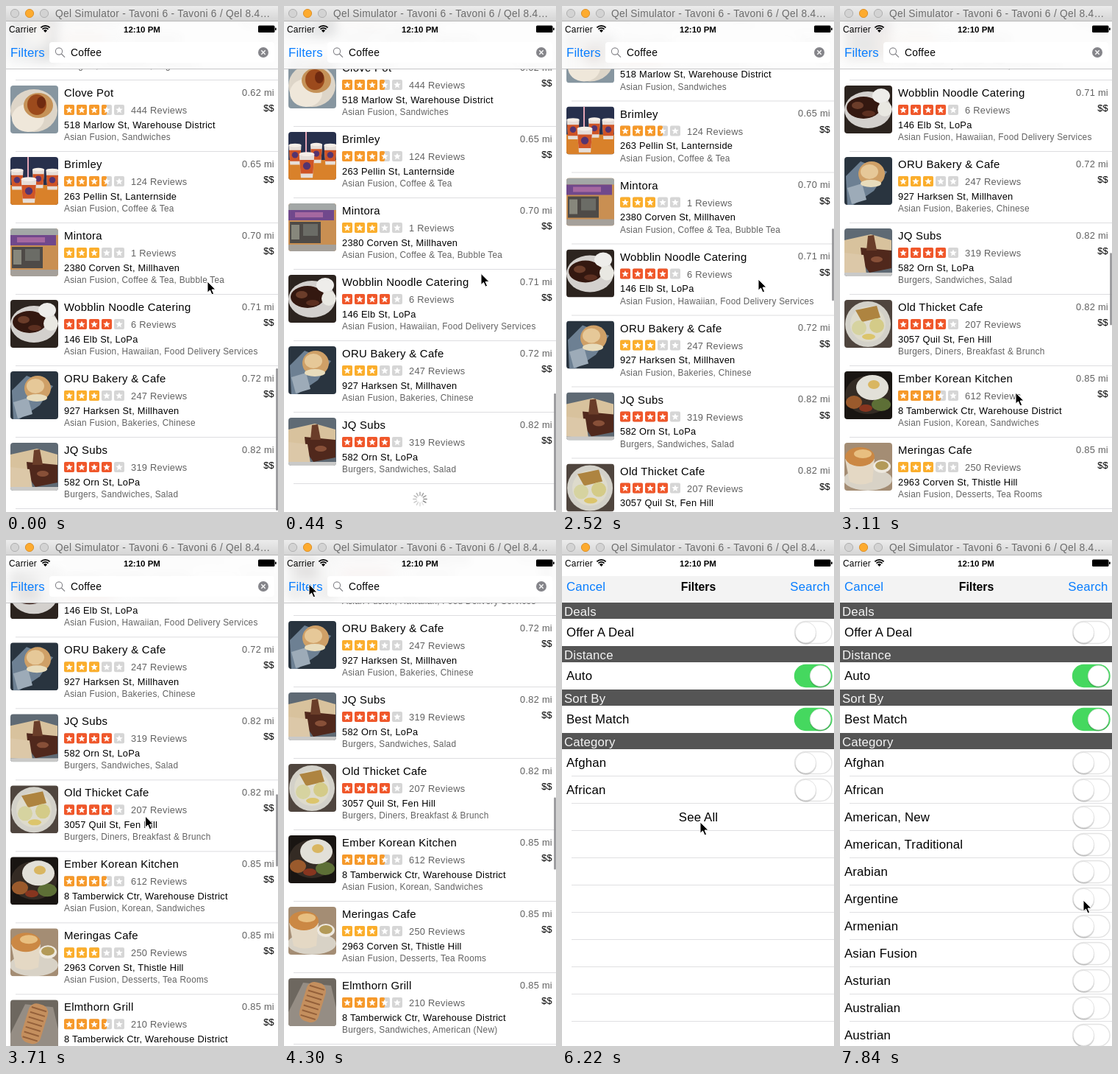
An HTML page for the animation above (7990 ms loop, 370 by 687 pixels).

```html
<!DOCTYPE html>
<html lang="en">
<head>
<meta charset="utf-8">
<title>Places and filters</title>
<style>
html, body { margin: 0; height: 100%; overflow: hidden; background: #fff; }
svg { display: block; width: 100vw; height: 100vh; }
text { font: 12.83px "Liberation Sans", Arial, sans-serif; letter-spacing: .021em; white-space: pre; }
.name { font-size: 14.9px; }
.kind { font-size: 11.85px; }
.big { font-size: 16.8px; letter-spacing: .01em; }
.bold { font-weight: bold; letter-spacing: 0; }
.soft { fill: #626262; }
.blue { fill: #087dff; }
.end { text-anchor: end; }
.mid { text-anchor: middle; }
</style>
</head>
<body>
<svg id="stage" viewBox="0 0 370 687"></svg>
<script>
const LOOP = 7990, STEP = 147.96, ROW = 97;

const rect = (x, y, w, h, fill, more = '') =>
  `<rect x="${x}" y="${y}" width="${w}" height="${h}" fill="${fill}" ${more}/>`;
const oval = (x, y, rx, ry, fill, more = '') =>
  `<ellipse cx="${x}" cy="${y}" rx="${rx}" ry="${ry}" fill="${fill}" ${more}/>`;
const path = (d, more) => `<path d="${d}" ${more}/>`;
const shape = (d, fill) => path(d, `fill="${fill}"`);
const text = (x, y, s, cls = '', more = '') =>
  `<text x="${x}" y="${y}" class="${cls}" ${more}>${s.replace(/&/g, '&amp;')}</text>`;
const range = (n, f) => Array.from({ length: n }, (_, i) => f(i)).join('');
const clamp = v => Math.max(0, Math.min(1, v));

// Food pictures, each 65 x 65
const cup = (x, y, s) => `<g transform="translate(${x} ${y}) scale(${s})">` +
  shape('M-9 0H9L7 28H-7Z', '#e6ded8') + shape('M-8.5 7H8.5L7.3 23H-7.3Z', '#cf5426') +
  oval(0, 14, 4.5, 4.5, '#54346f') + oval(0, 0, 9, 2.5, '#f6efe8') + '</g>';

const pics = {
  bowl: () => rect(0, 0, 65, 65, '#8796a0') + oval(32, 34, 32, 29, '#ddd5c8') + oval(24, 44, 22, 19, '#efe7da') +
    oval(38, 27, 20, 17, '#c59258') + oval(36, 26, 13, 14, '#9c4a1c') + oval(42, 23, 6, 8, '#6f2a10'),
  cups: () => rect(0, 0, 65, 65, '#27304c') + rect(0, 38, 65, 27, '#d9812a') + cup(9, 18, .95) + cup(38, 17, .9) +
    cup(57, 18, .95) + rect(23, 0, 2, 32, '#e3a3b4') + cup(25, 30, 1.15),
  shop: () => rect(0, 0, 65, 65, '#c98f52') + rect(0, 0, 65, 9, '#a3a7a6') + rect(0, 9, 62, 14, '#70488c') +
    rect(9, 12, 38, 7, '#a568a0') + rect(2, 25, 42, 29, '#4e4a47') + rect(4, 29, 11, 20, '#87877c') +
    rect(20, 28, 20, 16, '#6b6c66') + rect(0, 56, 65, 9, '#a5a09a'),
  plate: () => rect(0, 0, 65, 65, '#2c241f') + oval(32, 33, 32, 25, '#d3d0cd') + oval(26, 30, 23, 15, '#341810') +
    oval(18, 27, 8, 5, '#6b3d2a') + oval(33, 38, 9, 4, '#5c2f20') + oval(50, 14, 12, 10, '#eeedea') + oval(55, 32, 10, 10, '#e9e8e2'),
  bun: () => rect(0, 0, 65, 65, '#29343f') + shape('M2 26L22 6L58 20L40 46L12 65H4Z', '#6d8093') +
    shape('M4 42L24 36L30 58L10 64Z', '#9dabb8') + oval(37, 23, 18, 17, '#cfa067') +
    oval(34, 20, 12, 10, '#e6c898') + oval(36, 36, 14, 5, '#e8dcbc'),
  sub: () => rect(0, 0, 65, 65, '#5f6a74') + shape('M0 16L36 8L64 16V40L0 36Z', '#d8c29d') +
    shape('M22 26L64 30V54L34 60L24 46Z', '#50281c') + shape('M0 33L26 36L30 62L0 60Z', '#dcc8a8') +
    shape('M32 10L40 9L44 30L30 30Z', '#6a3d29') + oval(44, 42, 8, 4, '#885038') + rect(0, 60, 65, 5, '#c9c9c8'),
  eggs: () => rect(0, 0, 65, 65, '#4f453e') + oval(32, 33, 31, 31, '#d3d1c9') + oval(32, 33, 24, 24, '#dedbcc') +
    shape('M15 14L44 8L49 24L24 30Z', '#ae8440') + oval(20, 38, 10, 10, '#d6d3a0') + oval(44, 35, 10, 10, '#d4cb88') + oval(33, 50, 9, 4, '#dcc56c'),
  stone: () => rect(0, 0, 65, 65, '#191512') + oval(32, 32, 31, 26, '#342b24') + oval(13, 42, 11, 9, '#9a5a2c') +
    oval(50, 45, 13, 9, '#5d6f36') + oval(38, 22, 22, 17, '#e2e0d8') + oval(40, 18, 8, 6, '#d9b661') + oval(29, 50, 9, 5, '#87351f'),
  souffle: () => rect(0, 0, 65, 65, '#a48d74') + oval(32, 50, 33, 15, '#d8d2c6') + shape('M1 22H41L38 53Q22 60 7 53Z', '#e4d8c4') +
    oval(21, 19, 20, 13, '#cb8844') + oval(25, 15, 12, 6, '#e8bf80') + oval(51, 32, 12, 9, '#eee9df') + oval(51, 31, 9, 6, '#b39a58'),
  wrap: () => rect(0, 0, 65, 65, '#6d675f') + shape('M0 46L20 6L58 10L65 40V65H0Z', '#958d84') +
    `<g transform="rotate(17 33 34)">` + rect(19, 5, 27, 55, '#c48f5e', 'rx="11"') +
    range(7, i => rect(22, 11 + i * 7, 21, 2, '#94603a')) + '</g>'
};

// name, stars, reviews, miles, address, kinds, picture
const places = [
  ['Corner Pot', 3.5, '98', '0.60', '21 Ardel St, Millhaven', 'Burgers, Sandwiches, Vegetarian', 'bun'],
  ['Clove Pot', 3.5, '444', '0.62', '518 Marlow St, Warehouse District', 'Asian Fusion, Sandwiches', 'bowl'],
  ['Brimley', 3.5, '124', '0.65', '263 Pellin St, Lanternside', 'Asian Fusion, Coffee & Tea', 'cups'],
  ['Mintora', 3, '1', '0.70', '2380 Corven St, Millhaven', 'Asian Fusion, Coffee & Tea, Bubble Tea', 'shop'],
  ['Wobblin Noodle Catering', 4, '6', '0.71', '146 Elb St, LoPa', 'Asian Fusion, Hawaiian, Food Delivery Services', 'plate'],
  ['ORU Bakery & Cafe', 3, '247', '0.72', '927 Harksen St, Millhaven', 'Asian Fusion, Bakeries, Chinese', 'bun'],
  ['JQ Subs', 4, '319', '0.82', '582 Orn St, LoPa', 'Burgers, Sandwiches, Salad', 'sub'],
  ['Old Thicket Cafe', 4, '207', '0.82', '3057 Quil St, Fen Hill', 'Burgers, Diners, Breakfast & Brunch', 'eggs'],
  ['Ember Korean Kitchen', 3.5, '612', '0.85', '8 Tamberwick Ctr, Warehouse District', 'Asian Fusion, Korean, Sandwiches', 'stone'],
  ['Meringas Cafe', 3, '250', '0.85', '2963 Corven St, Thistle Hill', 'Asian Fusion, Desserts, Tea Rooms', 'souffle'],
  ['Elmthorn Grill', 3.5, '210', '0.85', '8 Tamberwick Ctr, Warehouse District', 'Burgers, Sandwiches, American (New)', 'wrap']
];
const starTint = { 3: '#fbae2c', 3.5: '#f6992a', 4: '#f0572a' };
const starPath = 'M' + Array.from({ length: 10 }, (_, i) => {
  const a = i * Math.PI / 5, r = i % 2 ? 2.2 : 5;
  return (7 + r * Math.sin(a)).toFixed(2) + ' ' + (7.4 - r * Math.cos(a)).toFixed(2);
}).join('L') + 'Z';

const stars = n => range(5, i => `<g transform="translate(${79 + 17 * i} 26)">` +
  rect(0, 0, 14, 14, '#d6d6d6', 'rx="2"') +
  (n > i ? rect(0, 0, 14 * Math.min(1, n - i), 14, starTint[n], 'rx="2"') : '') +
  shape(starPath, '#fff') + '</g>');

const place = ([name, rating, reviews, miles, address, kinds, pic], i) =>
  `<g transform="translate(0 ${108 + ROW * (i - 1)})">` +
  `<g transform="translate(6 0)" clip-path="url(#photo)">${pics[pic]()}</g>` +
  text(79, 15, name, 'name') + stars(rating) +
  text(170, 38, reviews + ' Reviews', 'soft') + text(79, 57.6, address) + text(79, 74, kinds, 'kind soft') +
  text(365, 13.5, miles + ' mi', 'soft end') + text(365, 35, '$$', 'end') +
  rect(13, 89, 357, 1, '#dddde0') + '</g>';

const spinner = '<g id="spin" transform="translate(185 703.5)">' +
  range(12, i => path('M0 -5V-9.2', `stroke="#777" stroke-width="1.5" stroke-linecap="round"
    opacity="${.2 + i * .06}" transform="rotate(${i * 30})"`)) + '</g>';

const toggle = (y, on) => `<g transform="translate(316 ${y})">` +
  rect(.5, -15, 50.5, 30, on ? '#45d85f' : '#fff', `rx="15" stroke="${on ? '#45d85f' : '#e3e3e3'}" stroke-width="1.4"`) +
  oval(on ? 35.5 : 15.5, 2, 14.5, 14.2, '#000', 'opacity=".16"') +
  oval(on ? 35.5 : 15.5, 0, 14.2, 14.2, '#fff', 'stroke="#d0d0d0" stroke-width=".6"') + '</g>';
const option = (y, label, on) => text(6, y + 5.7, label, 'big') + toggle(y, on);
const header = (y, label) => rect(0, y, 370, 22, '#555') + text(3, y + 18, label, 'big', 'fill="#f4f4f4"');

const kinds = ['American, New', 'American, Traditional', 'Arabian', 'Argentine', 'Armenian',
  'Asian Fusion', 'Asturian', 'Australian', 'Austrian'];

const filters = '<g id="modal">' + rect(0, 21, 370, 687, '#fff') + rect(0, 49, 370, 36, '#f3f3f3') +
  text(6, 69, 'Cancel', 'big blue') + text(364.5, 69, 'Search', 'big blue end') +
  text(185.5, 69, 'Filters', 'bold mid', 'style="font-size:15.8px"') +
  header(85, 'Deals') + option(125.5, 'Offer A Deal') +
  header(144, 'Distance') + option(184.5, 'Auto', true) +
  header(203, 'Sort By') + option(243.5, 'Best Match', true) +
  header(262, 'Category') + option(302.5, 'Afghan') + option(339.5, 'African') +
  range(10, i => rect(13, 320 + 37 * i, 357, 1, '#e0e0e2')) +
  text(185.5, 382, 'See All', 'big mid', 'id="seeAll"') +
  `<g id="more">${range(kinds.length, i => option(376.5 + 37 * i, kinds[i]))}</g></g>`;

const navBar = rect(0, 21, 370, 64, '#fdfdfd') +
  '<g clip-path="url(#bar)"><g opacity=".14" filter="url(#blur)"><use href="#list"/></g></g>' +
  rect(59, 49, 306, 28, '#fff', 'rx="4"') + rect(0, 85, 370, .8, '#b8b8bb') +
  text(6, 69, 'Filters', 'big blue') + text(88, 67.5, 'Coffee', '', 'style="font-size:13.8px"') +
  oval(72, 61.5, 4.6, 4.6, 'none', 'stroke="#85858a" stroke-width="1.1"') +
  path('M75.4 65L80 69.6', 'stroke="#85858a" stroke-width="1.3"') +
  oval(350, 63, 7, 7, '#85858a') + path('M347.3 60.3l5.4 5.4m0 -5.4l-5.4 5.4', 'stroke="#fff" stroke-width="1.3"');

const arc = (r, w) => path(`M${53.5 - r * .72} ${35.5 - r * .72}A${r} ${r} 0 0 1 ${53.5 + r * .72} ${35.5 - r * .72}`,
  `fill="none" stroke="#000" stroke-width="${w}"`);
const status = text(4, 35.5, 'Carrier', 'kind') + arc(8.5, 1.8) + arc(5.5, 1.8) + shape('M53.5 36L51 33.2Q53.5 31 56 33.2Z', '#000') +
  text(185, 35.5, '12:10 PM', 'bold mid', 'style="font-size:11.5px"') +
  rect(343, 26.5, 22.5, 9.5, '#000', 'rx="1.5"') + rect(366, 29.5, 1.7, 3.6, '#000', 'rx=".8"');

const light = (x, fill, edge) => oval(x, 10, 5.6, 5.6, fill, `stroke="${edge}"`);
const titleBar = rect(0, 0, 370, 21, 'url(#chrome)') + rect(0, 20, 370, 1, '#b9b9b9') +
  light(12, '#d3d3d3', '#b0b0b0') + light(32, '#fdab2f', '#dd912a') + light(52, '#d3d3d3', '#b0b0b0') +
  text(67, 15, 'Qel Simulator - Tavoni 6 - Tavoni 6 / Qel 8.4…', '', 'fill="#6c6c6c" style="font-size:13.75px"');

stage.innerHTML = `<defs>
  <clipPath id="photo"><rect width="65" height="65" rx="4"/></clipPath>
  <clipPath id="bar"><rect y="21" width="370" height="64"/></clipPath>
  <filter id="blur"><feGaussianBlur stdDeviation="8"/><feColorMatrix type="saturate" values=".4"/></filter>
  <linearGradient id="chrome" x2="0" y2="1"><stop stop-color="#ececec"/><stop offset="1" stop-color="#d4d4d4"/></linearGradient>
  </defs>` + rect(0, 0, 370, 687, '#fff') +
  `<g id="list">${places.slice(0, 7).map(place).join('')}${spinner}
  <g id="extra">${places.slice(7).map((p, i) => place(p, i + 7)).join('')}</g></g>` +
  rect(367.3, 0, 2.5, 98, '#8f8f92', 'id="thumb" rx="1.2"') + navBar + filters + status + titleBar +
  path('M0 0V15.2L3.5 12L6 17.8L8.6 16.7L6.1 11H11Z', 'id="cursor" stroke="#fff" stroke-width="1" stroke-linejoin="round"');

// Keys are [step, value, ...]
const scrollKeys = [[0, 0], [2, 26], [4, 42], [6, 36.5], [15, 36.5], [16, 46], [17, 68.5], [18, 132], [19, 205],
  [20, 255], [21, 291], [22, 312], [24, 345], [27, 380], [29, 386]];
const cursorKeys = [[0, 274, 374], [2, 272, 340], [5, 260, 410], [7, 257, 426], [8, 257, 428], [15, 262, 430],
  [16, 266, 405], [17, 267, 371], [18, 266, 330], [20, 245, 490], [21, 239, 525], [22, 238, 528], [24, 236, 470],
  [28, 50, 90], [29, 34, 60], [32, 34, 60], [34, 80, 130], [38, 225, 340], [39, 240, 357], [42, 188, 383],
  [44, 188, 383], [45, 196, 388], [48, 322, 464], [49, 322, 464], [53, 331, 489]];

function at(keys, s) {
  const i = keys.findIndex(k => k[0] >= s);
  if (i < 1) return keys.at(i).slice(1);
  const a = keys[i - 1], b = keys[i], p = (s - a[0]) / (b[0] - a[0]);
  return a.slice(1).map((v, j) => v + (b[j + 1] - v) * p);
}
const set = (id, name, value) => document.getElementById(id).setAttribute(name, value);
const show = (id, on) => set(id, 'visibility', on ? 'visible' : 'hidden');

function draw(s) {
  const [scroll] = at(scrollKeys, s), loaded = s >= 13;
  set('list', 'transform', `translate(0 ${-scroll})`);
  set('spin', 'transform', `translate(185 703.5) rotate(${Math.floor(s * 12 * STEP / 1000) * 30})`);
  show('spin', !loaded);
  show('extra', loaded);

  set('thumb', 'y', loaded ? 292 + .149 * scroll : 492 + scroll);
  set('thumb', 'height', loaded ? 98 : 193 - scroll);
  set('thumb', 'opacity', loaded ? clamp(s - 15) * clamp((33 - s) / 3) : clamp((6 - s) / 3));

  const rise = (1 - clamp((s - 30.8) / 3.4)) ** 3, open = clamp((s - 43.3) / 2);
  set('modal', 'transform', `translate(0 ${666 * rise})`);
  show('modal', rise < 1);
  set('seeAll', 'opacity', 1 - open);
  set('more', 'opacity', open);
  set('cursor', 'transform', `translate(${at(cursorKeys, s)})`);
}

let last = -1;
function tick() {
  const s = Math.min(53, Math.floor((performance.now() % LOOP + 5) / STEP));
  if (s !== last) draw(last = s);
  requestAnimationFrame(tick);
}
tick();
</script>
</body>
</html>
```
